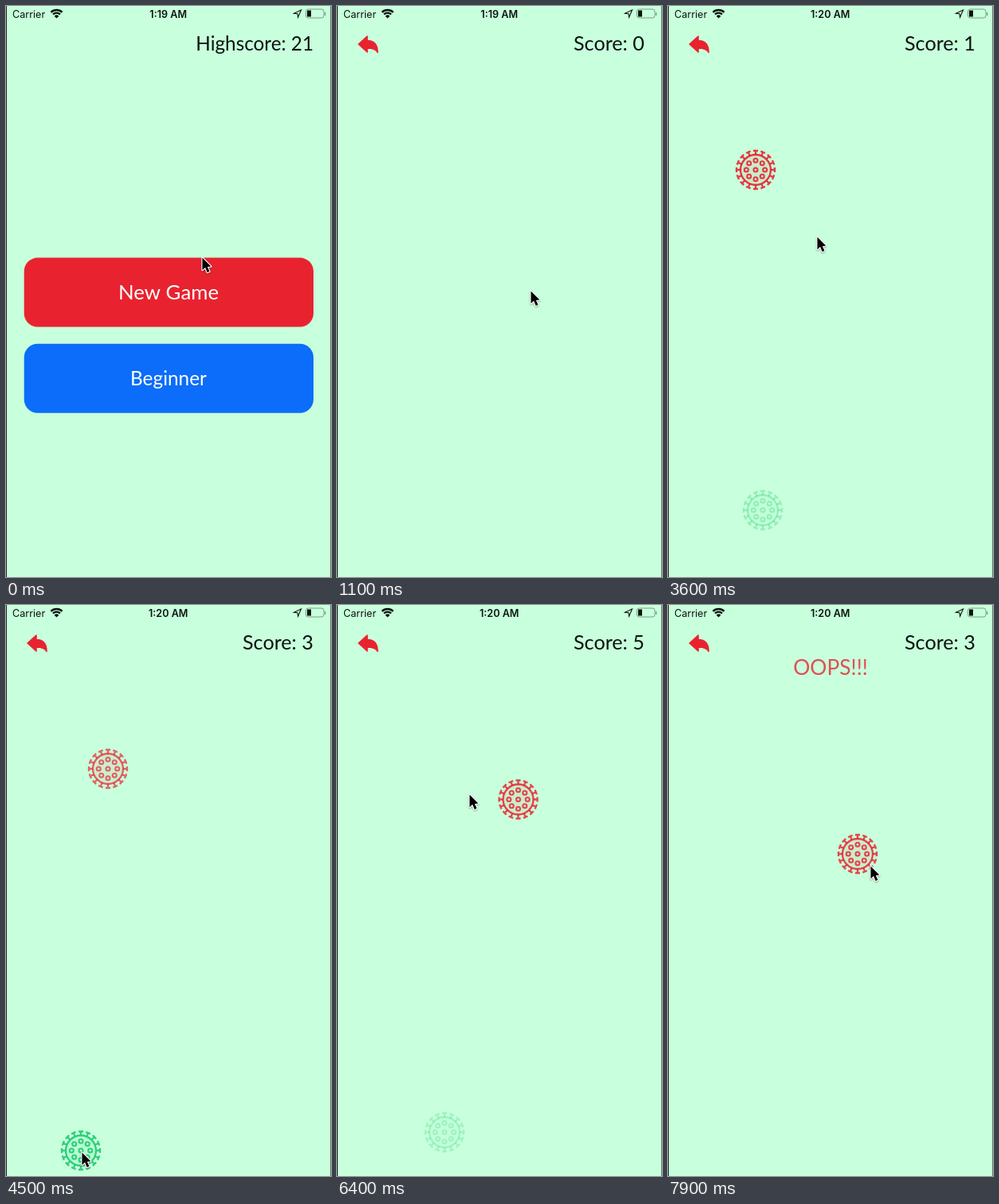
Recreate the animation shown at these times as an HTML page with a canvas. Size 408 by 718 pixels, loop 8000 ms.

```html
<!DOCTYPE html>
<html lang="en">
<head>
<meta charset="utf-8">
<title>Tap the virus</title>
<style>
  html, body { margin: 0; width: 100%; height: 100%; overflow: hidden; background: #c8ffdc; }
  canvas { display: block; }
</style>
</head>
<body>
<canvas id="stage" width="408" height="718"></canvas>
<script>
const ctx = document.getElementById('stage').getContext('2d');
const W = 408, H = 718, LOOP = 8000, STEP = 100;
const MINT = '#c8ffdc', RED = '#e8232f', BLUE = '#0b6df9', GREEN = '#2dcf7a', INK = '#0c1410';
const GAME_FONT = 'Lato, "Open Sans", sans-serif';
const UI_FONT = 'Inter, Roboto, sans-serif';

// Each virus is shown until it is hit (+1) or missed (-1); 0 means it just leaves.
const viruses = [
  { x: 119, y: 634, from: 2600, to: 3270, points: 1 },
  { x: 110, y: 206, from: 3300, to: 3900, points: 1 },
  { x: 94, y: 686, from: 3900, to: 4500, points: 1 },
  { x: 128, y: 206, from: 4500, to: 5300, points: 1, message: 'WOW!!!' },
  { x: 150.5, y: 233, from: 5300, to: 5700, points: 0 },
  { x: 135, y: 663, from: 5700, to: 6030, points: 1 },
  { x: 227.5, y: 244.5, from: 6200, to: 6600, points: 1 },
  { x: 210, y: 679, from: 6600, to: 6900, points: -1, message: 'OOPS!!!' },
  { x: 370, y: 505, from: 6900, to: 7300, points: -1, message: 'OOPS!!!' },
  { x: 183, y: 420, from: 7300, to: 7700, points: -1, message: 'OOPS!!!' },
  { x: 238, y: 313, from: 7700, to: 9000, points: 0 }
];

// time, x, y
const pointerPath = [
  [0, 246, 316], [300, 243, 361], [900, 243, 361], [2000, 243, 326], [2500, 243, 326],
  [3200, 120, 640], [3300, 120, 640], [3600, 187, 290], [3900, 112, 206], [4500, 95, 688],
  [5200, 130, 208], [5500, 138, 129], [5700, 150, 230], [6000, 136, 664], [6400, 166, 238],
  [6600, 226, 244], [6900, 210, 640], [7300, 350, 500], [7600, 205, 410], [7900, 254, 328],
  [8000, 245, 320]
];

const clamp = v => Math.max(0, Math.min(1, v));

function text(str, x, y, size, color, align = 'left', font = GAME_FONT, weight = 400) {
  ctx.font = `${weight} ${size}px ${font}`;
  ctx.textAlign = align;
  ctx.fillStyle = color;
  ctx.fillText(str, x, y);
}

function withAlpha(alpha, draw) {
  ctx.save();
  ctx.globalAlpha = alpha;
  draw();
  ctx.restore();
}

function cover(color, alpha = 1) {
  withAlpha(alpha, () => {
    ctx.fillStyle = color;
    ctx.fillRect(0, 0, W, H);
  });
}

function button(label, y, color, size, labelAlpha = 1) {
  ctx.fillStyle = color;
  ctx.beginPath();
  ctx.roundRect(22.7, y, 363.3, 87, 17);
  ctx.fill();
  withAlpha(labelAlpha, () => text(label, 204, y + 52.5, size, '#fff', 'center'));
}

function menu(pressed) {
  text('Highscore: 21', 386, 56, 24.3, INK, 'right');
  button('New Game', 316.6, RED, 25.8, pressed ? 0.3 : 1);
  button('Beginner', 424.8, BLUE, 24.4);
}

function backArrow() {
  const shape = new Path2D('M27 48 L38 38 V43.5 C47 43.5 51 49 51 58.5 C49 54.5 45 53 38 53 V58 Z');
  ctx.fillStyle = ctx.strokeStyle = RED;
  ctx.lineWidth = 1.5;
  ctx.lineJoin = 'round';
  ctx.fill(shape);
  ctx.stroke(shape);
}

function drawVirus(x, y, color, alpha) {
  ctx.save();
  ctx.translate(x, y);
  ctx.strokeStyle = ctx.fillStyle = color;
  ctx.lineWidth = 2.3;
  ctx.beginPath();
  ctx.arc(0, 0, 19, 0, 7);
  ctx.globalAlpha = alpha * 0.1;
  ctx.fill();
  ctx.globalAlpha = alpha;
  ctx.stroke();
  for (let i = 0; i < 16; i++) {
    ctx.beginPath();
    ctx.moveTo(19, 0);
    ctx.lineTo(24, 0);
    ctx.moveTo(24, -3);
    ctx.lineTo(24, 3);
    ctx.stroke();
    ctx.rotate(Math.PI / 8);
  }
  ctx.lineWidth = 2.1;
  for (let i = 0; i < 9; i++) {
    const angle = i * Math.PI / 4, r = i < 8 ? 11.7 : 0;
    ctx.beginPath();
    ctx.arc(r * Math.cos(angle), r * Math.sin(angle), 2.5, 0, 7);
    ctx.stroke();
  }
  ctx.restore();
}

function playfield(t) {
  let score = 0;
  for (const v of viruses) {
    const age = t - v.to;
    if (age >= 0) {
      score += v.points;
      if (v.points > 0) drawVirus(v.x, v.y, GREEN, clamp(1 - age / 500));
      if (v.message) {
        const color = v.points > 0 ? '#1f6a3a' : '#e04448';
        withAlpha(clamp((600 - age) / 430), () => text(v.message, 204, 88, 26.4, color, 'center'));
      }
    } else if (t >= v.from) {
      drawVirus(v.x, v.y, RED, clamp(0.7 + (t - v.from) / 1500));
    }
  }
  text('Score: ' + score, 297, 56, 25.2, INK);
}

function statusBar(t) {
  text('Carrier', 8, 14.5, 12.6, INK, 'left', UI_FONT);
  text(t < 2300 ? '1:19 AM' : '1:20 AM', 203.7, 14.5, 12.6, INK, 'center', UI_FONT, 600);

  ctx.strokeStyle = ctx.fillStyle = INK;
  ctx.lineWidth = 2.3;
  for (const r of [10, 6.4]) {
    ctx.beginPath();
    ctx.arc(63.5, 15, r, -Math.PI * 0.75, -Math.PI * 0.25);
    ctx.stroke();
  }
  ctx.beginPath();
  ctx.moveTo(63.5, 15.5);
  ctx.arc(63.5, 15.5, 4, -Math.PI * 0.75, -Math.PI * 0.25);
  ctx.fill();

  ctx.lineWidth = 1.1;
  ctx.stroke(new Path2D('M370.5 5 L361.5 9.3 L366 9.8 L366.6 14.2 Z'));

  ctx.strokeStyle = '#7c9e89';
  ctx.lineWidth = 1;
  ctx.beginPath();
  ctx.roundRect(376.5, 4, 22.5, 11, 3);
  ctx.stroke();
  ctx.fillRect(378, 5.5, 5, 8);
  ctx.fillStyle = '#7c9e89';
  ctx.fillRect(400, 8, 1.3, 4);
}

function pointer(t) {
  const i = Math.max(1, pointerPath.findIndex(p => p[0] > t));
  const [t0, x0, y0] = pointerPath[i - 1], [t1, x1, y1] = pointerPath[i];
  const u = clamp((t - t0) / (t1 - t0)), ease = u * u * (3 - 2 * u);
  ctx.save();
  ctx.translate(x0 + (x1 - x0) * ease, y0 + (y1 - y0) * ease);
  ctx.scale(0.95, 0.95);
  const shape = new Path2D('M0.5 0.5 V17 L4.3 13.5 L7 20 L10 18.8 L7.2 12.6 L12 12.2 Z');
  ctx.shadowColor = '#0005';
  ctx.shadowBlur = 2;
  ctx.shadowOffsetY = 1;
  ctx.strokeStyle = '#fff';
  ctx.lineWidth = 2.4;
  ctx.lineJoin = 'round';
  ctx.stroke(shape);
  ctx.shadowColor = 'transparent';
  ctx.fillStyle = '#000';
  ctx.fill(shape);
  ctx.restore();
}

function render(t) {
  // The screens cross-dissolve, with black showing through both halfway.
  const dissolve = Math.sin(clamp((t - 800) / 300) * Math.PI / 2);
  cover(MINT);
  if (dissolve < 1) menu(dissolve > 0);
  cover(MINT, dissolve);
  withAlpha(clamp(dissolve * 1.4), backArrow);
  cover('#000', dissolve * (1 - dissolve) * 1.1);
  if (dissolve > 0) playfield(t);
  statusBar(t);
  ctx.fillStyle = '#1c2a22';
  ctx.fillRect(0, 0, 1, H);
  withAlpha(0.6, () => ctx.fillRect(W - 1, 0, 1, H));
  pointer(t);
}

function tick() {
  const t = performance.now() % LOOP;
  render(Math.floor(t / STEP) * STEP);
  requestAnimationFrame(tick);
}
tick();
</script>
</body>
</html>
```
